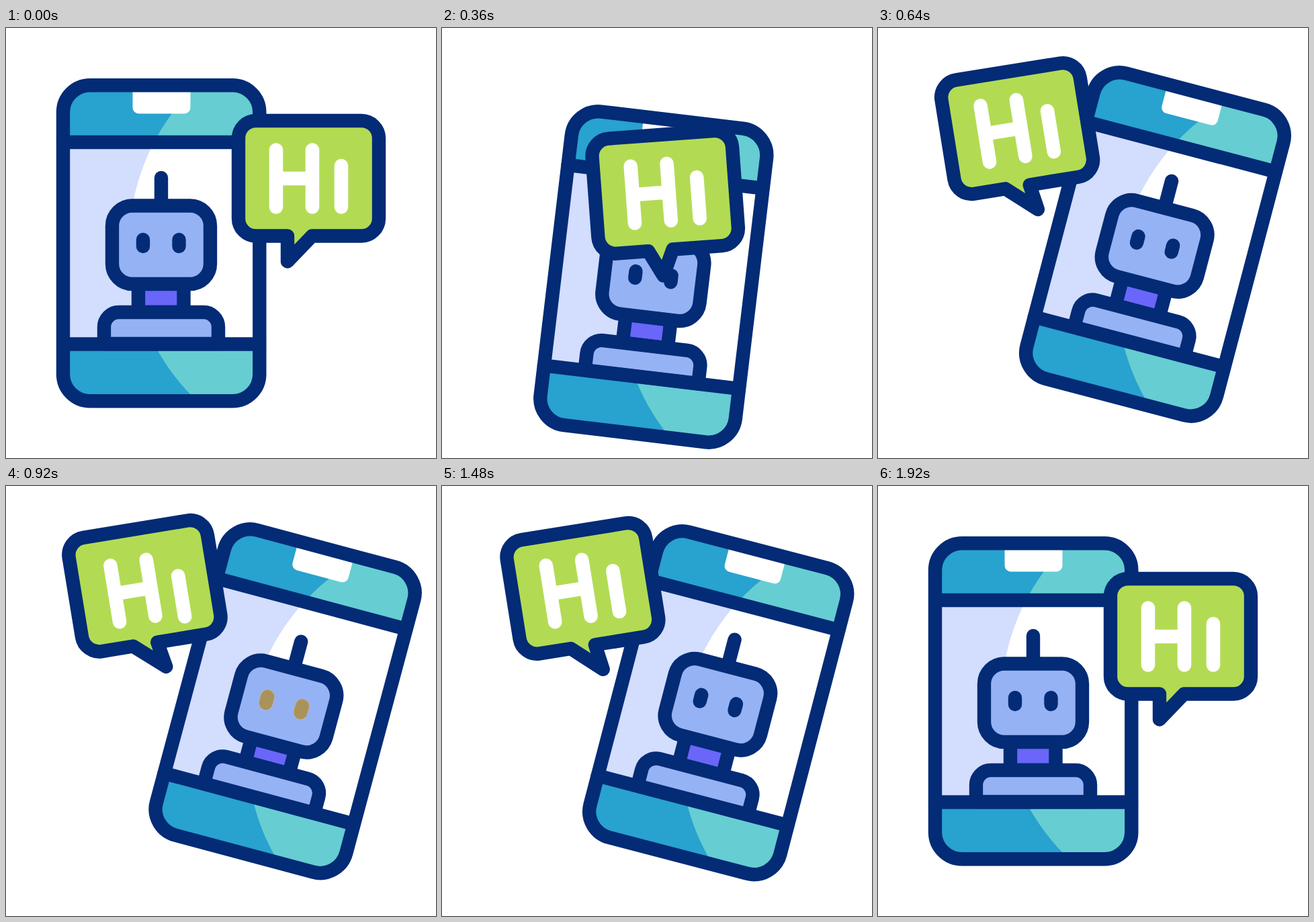
Recreate the animation shown at these times as an HTML page. Size 640x640 px, loop 2000 ms.

```html
<!DOCTYPE html>
<html lang="en">
<head>
<meta charset="utf-8">
<title>Chat robot</title>
<style>
html, body { margin: 0; width: 100%; height: 100%; overflow: hidden; background: #fff; }
svg { display: block; width: 100vw; height: 100vh; }
.line { stroke: #032b76; stroke-width: 20.4; stroke-linecap: round; stroke-linejoin: round; }
.none { fill: none; }
.blue { fill: #28a2ce; }
.teal { fill: #66cdd2; }
.skin { fill: #95b2f4; }
</style>
</head>
<body>
<svg viewBox="0 0 640 640">
  <defs>
    <clipPath id="body"><rect x="-146" y="-235" width="292.3" height="470" rx="40"/></clipPath>
    <clipPath id="shine"><circle cx="277.5" r="325"/></clipPath>
  </defs>
  <g id="phone">
    <g clip-path="url(#body)">
      <path fill="#d3ddfd" d="M-146-150h293v300h-293z"/>
      <path class="blue" d="M-146-235h293v85h-293zM-146 150h293v85h-293z"/>
      <g clip-path="url(#shine)">
        <path fill="#fff" d="M-146-150h293v300h-293z"/>
        <path class="teal" d="M-146-235h293v85h-293zM-146 150h293v85h-293z"/>
      </g>
      <rect x="-42.5" y="-235" width="86" height="42.5" rx="9" fill="#fff"/>
    </g>
    <path class="line" fill="#6a66f9" d="M-34 55H33.5V103H-34z"/>
    <path class="line skin" d="M-85 150V125a22 22 0 0 1 22-22H63a22 22 0 0 1 22 22V150z"/>
    <g id="head">
      <path class="line" d="M0-97V-56"/>
      <rect class="line skin" x="-73" y="-55.5" width="146" height="116.5" rx="30"/>
      <path class="line" d="M-27-5V5M26.5-5V5"/>
      <path id="glow" d="M-27-5V5M26.5-5V5" stroke="#ffc94c" stroke-width="21.4" stroke-linecap="round"/>
    </g>
    <path class="line none" d="M-146-150H146M-146 150.5H146"/>
    <rect class="line none" x="-146" y="-234.8" width="292.3" height="470" rx="40"/>
  </g>
  <g id="bubble">
    <path id="balloon" class="line" fill="#b2db53"/>
    <g fill="none" stroke="#fff" stroke-width="20.6" stroke-linecap="round">
      <path id="bigH" d="M-48.5-42.5V42.5M5.5-42.5V42.5M-48.5 0H5.5"/>
      <path id="smallI" d="M48.5-19V42.5"/>
    </g>
  </g>
</svg>
<script>
const $ = id => document.getElementById(id);

// Smooth curve through [time, value] knots, flat at turning points and ends
function curve(...knots) {
  const slope = i => {
    const a = knots[i], b = knots[i + 1];
    return a && b ? (b[1] - a[1]) / (b[0] - a[0]) : 0;
  };
  const tangent = i => {
    const a = slope(i - 1), b = slope(i);
    return a * b > 0 ? 2 * a * b / (a + b) : 0;
  };
  return t => {
    const last = knots.length - 1;
    if (t <= knots[0][0]) return knots[0][1];
    if (t >= knots[last][0]) return knots[last][1];
    const i = knots.findIndex(k => k[0] > t) - 1;
    const [t0, v0] = knots[i], [t1, v1] = knots[i + 1];
    const d = t1 - t0, u = (t - t0) / d, w = 1 - u;
    return v0 * w * w * (1 + 2 * u) + v1 * u * u * (3 - 2 * u)
      + d * u * w * (tangent(i) * w - tangent(i + 1) * u);
  };
}

const phoneMove = curve([120, 0], [240, .172], [480, .731], [680, 1],
  [1420, 1], [1480, .976], [1680, .507], [1800, .285], [1920, 0]);
const bubbleMove = curve([120, 0], [240, .123], [480, .838], [660, 1],
  [1420, 1], [1480, .988], [1680, .633], [1800, .25], [1920, 0]);
const nod = curve([700, 0], [940, 5.6], [1240, 0]);
const glow = curve([700, 0], [980, .75], [1240, 0]);
const hopH = curve([680, 0], [820, 12], [920, 4], [1020, -17], [1180, 0]);
const hopI = curve([740, 0], [915, 12], [1000, 4], [1100, -17], [1240, 0]);
const sway = curve([700, 0], [920, 3], [1020, 0]);

const place = (id, x, y, angle = 0) =>
  $(id).setAttribute("transform", `translate(${x} ${y}) rotate(${angle})`);

function draw() {
  const t = Math.floor(performance.now() % 2000 / 40) * 40;
  const p = phoneMove(t), s = bubbleMove(t);

  place("phone", 231 + 184.5 * p, 320 + p * (1 - p) * (167 + 201 * p - 270 * p * p), 15 * p);
  place("head", 0, nod(t));
  $("glow").setAttribute("opacity", glow(t));

  place("bubble", 450.5 - 244 * s, 224 - 75 * s + 228 * s * (1 - s), -9.3 * p);
  $("balloon").setAttribute("d", `M-78.5-86H78.5a26 26 0 0 1 26 26V59.5a26 26 0 0 1-26 26H5
    L${-31.5 + 43.5 * p} 123.5L-31.5 85.5H-78.5a26 26 0 0 1-26-26V-60a26 26 0 0 1 26-26z`);
  place("bigH", sway(t), hopH(t));
  place("smallI", sway(t), hopI(t));

  requestAnimationFrame(draw);
}
draw();
</script>
</body>
</html>
```
